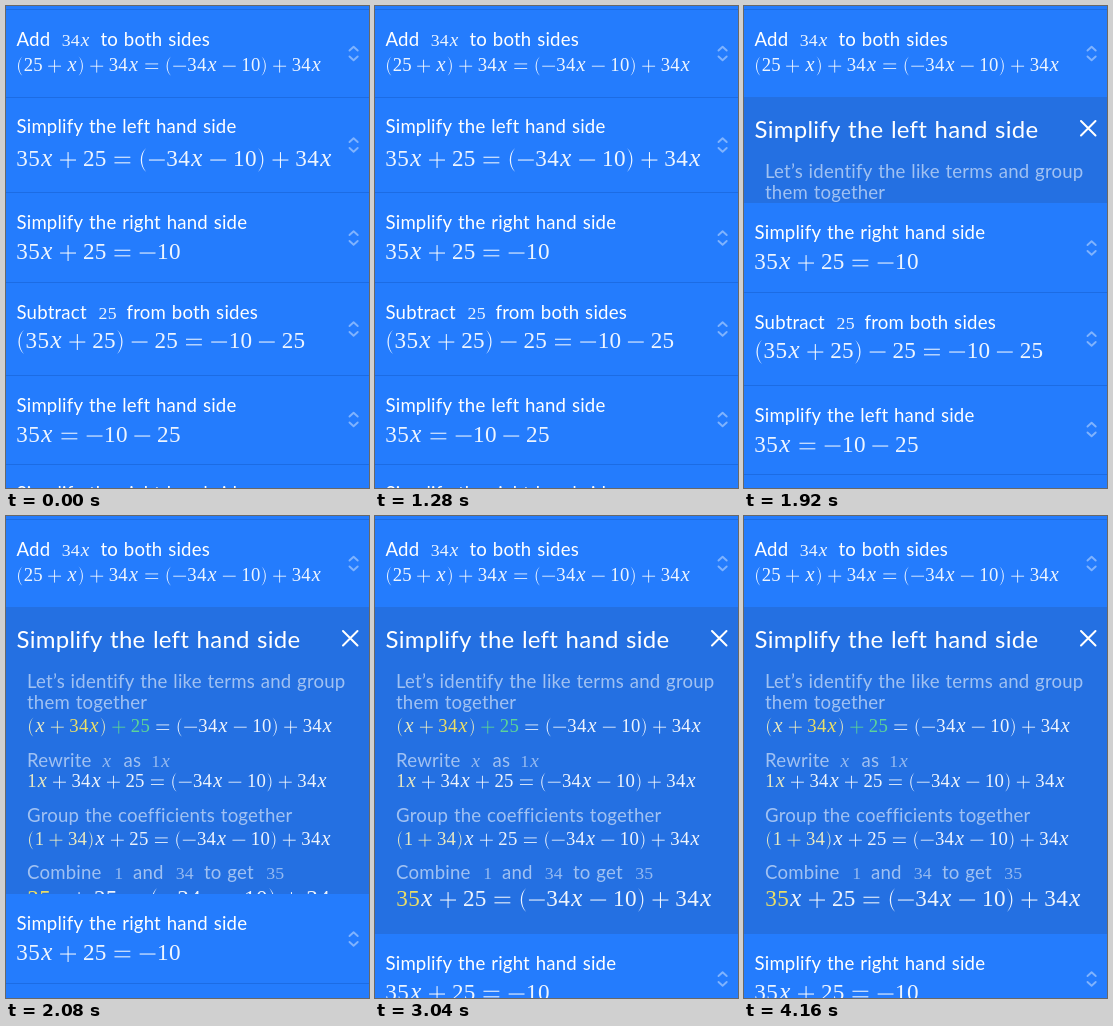
These frames come from a looping animation (363x482 px, 4.32 s). An HTML page with a canvas:

```html
<!DOCTYPE html>
<html lang="en">
<head>
<meta charset="utf-8">
<title>Equation steps</title>
<style>
  html, body { margin: 0; width: 100%; height: 100%; overflow: hidden; background: #247cfd; }
  canvas { display: block; width: 363px; height: 482px; }
</style>
</head>
<body>
<canvas id="stage"></canvas>
<script>
const W = 363, H = 482, LOOP = 4320, TICK = 160;
const BLUE = '#247cfd', PANEL = '#2470e2', RULE = '#1c6ce4';
const WHITE = '#fff', SOFT = 'rgba(255,255,255,.57)', ICON = 'rgba(255,255,255,.42)';
const CREAM = '#f8f3c0', YELLOW = '#fbe75c', GREEN = '#62dd91';
const TEXT = 18.6, SMALL = 19.3, LARGE = 23.85, INLINE = 18.3;

const PANEL_TOP = 91, PANEL_H = 96, GROWTH = 231;
const OPEN_AT = 1901.4, SPRING = 0.01775;
const RHS = '=(−34x−10)+34x';

const canvas = document.getElementById('stage');
const ctx = canvas.getContext('2d');
const dpr = window.devicePixelRatio || 1;
canvas.width = W * dpr;
canvas.height = H * dpr;

function say(text, x, y, color = WHITE, size = TEXT) {
  ctx.font = `${size}px Lato, sans-serif`;
  ctx.letterSpacing = size * 0.011 + 'px';
  ctx.wordSpacing = size * 0.04 + 'px';
  ctx.fillStyle = color;
  ctx.fillText(text, x, y);
}

function bar(x, y, w, h) {
  ctx.fillRect(x, y - h / 2, w, h);
}

function glyph(ch, x, y, size, style = '') {
  ctx.font = `${style} ${size}px "Liberation Serif", serif`;
  ctx.fillText(ch, x, y);
}

// A slender parenthesis: two arcs that meet at the tips.
function paren(ch, x, y, size) {
  const at = u => x + (ch === '(' ? u : 0.389 - u) * size;
  const top = y - 0.75 * size, mid = y - 0.25 * size, low = y + 0.25 * size;
  ctx.beginPath();
  ctx.moveTo(at(0.33), top);
  ctx.bezierCurveTo(at(0.03), mid - 0.27 * size, at(0.03), mid + 0.27 * size, at(0.33), low);
  ctx.bezierCurveTo(at(0.1), mid + 0.25 * size, at(0.1), mid - 0.25 * size, at(0.33), top);
  ctx.fill();
}

// Sets a formula from [string, colour] parts with TeX-like spacing.
function math(parts, x, y, size) {
  ctx.letterSpacing = ctx.wordSpacing = '0px';
  ctx.globalAlpha = 0.92;
  let prev = '(';
  for (const [text, color] of parts) {
    ctx.fillStyle = color;
    for (const ch of text) {
      if ('+−='.includes(ch)) {
        const unary = ch === '−' && '(='.includes(prev);
        const gap = unary ? 0 : ch === '=' ? 0.278 : 0.222;
        const left = x + (gap + 0.056) * size, w = 0.666 * size;
        const axis = y - 0.25 * size, line = 0.045 * size;
        if (ch === '=') {
          bar(left, axis - 0.117 * size, w, line);
          bar(left, axis + 0.117 * size, w, line);
        } else {
          bar(left, axis, w, line);
          if (ch === '+') bar(left + (w - line) / 2, axis, line, w);
        }
        x += (0.778 + 2 * gap) * size;
      } else if (ch === 'x') {
        glyph(ch, x + 0.055 * size, y, size * 1.05, 'italic');
        x += 0.572 * size;
      } else if ('()'.includes(ch)) {
        paren(ch, x, y, size);
        x += 0.389 * size;
      } else {
        glyph(ch, x + 0.01 * size, y, size * 0.97);
        x += 0.5 * size;
      }
      prev = ch;
    }
  }
  ctx.globalAlpha = 1;
}

const plain = (text, x, y, size, color = WHITE) => math([[text, color]], x, y, size);

function stroke(color, width, ...lines) {
  ctx.strokeStyle = color;
  ctx.lineWidth = width;
  ctx.lineCap = ctx.lineJoin = 'round';
  ctx.beginPath();
  for (const [start, ...rest] of lines) {
    ctx.moveTo(...start);
    for (const p of rest) ctx.lineTo(...p);
  }
  ctx.stroke();
}

function chevrons(y) {
  stroke(ICON, 1.9,
    [[343.5, y - 3], [347.6, y - 6.8], [351.7, y - 3]],
    [[343.5, y + 3], [347.6, y + 6.8], [351.7, y + 3]]);
}

function rule(y) {
  ctx.fillStyle = RULE;
  ctx.fillRect(0, y, W, 1);
}

function firstRow() {
  rule(3);
  say('Add', 10.5, 40);
  plain('34x', 55.5, 40, INLINE);
  say('to both sides', 94.5, 40);
  plain('(25+x)+34x=(−34x−10)+34x', 10, 65, SMALL);
  chevrons(47.5);
}

function closedRow() {
  rule(PANEL_TOP);
  say('Simplify the left hand side', 10.5, 127);
  plain('35x+25' + RHS, 10, 160, LARGE);
  chevrons(139);
  rule(186);
}

function laterRows() {
  say('Simplify the right hand side', 10.5, 223);
  plain('35x+25=−10', 10, 253, LARGE);
  chevrons(232);

  rule(276);
  say('Subtract', 10.5, 313);
  plain('25', 92.3, 313, INLINE);
  say('from both sides', 120.5, 313);
  plain('(35x+25)−25=−10−25', 10, 342, LARGE);
  chevrons(323);

  rule(369);
  say('Simplify the left hand side', 10.5, 406);
  plain('35x=−10−25', 10, 436, LARGE);
  chevrons(413.5);

  rule(458);
  say('Simplify the right hand side', 10.5, 494);
}

function openPanel(height) {
  ctx.save();
  ctx.beginPath();
  ctx.rect(0, PANEL_TOP, W, height);
  ctx.clip();
  ctx.fillStyle = PANEL;
  ctx.fillRect(0, PANEL_TOP, W, height);

  say('Simplify the left hand side', 10.5, 132, WHITE, 24);
  stroke(WHITE, 2, [[337, 115], [351.5, 129.5]], [[351.5, 115], [337, 129.5]]);

  say('Let’s identify the like terms and group', 21, 172, SOFT);
  say('them together', 21, 193, SOFT);
  math([['(x+', CREAM], ['34x', YELLOW], [')', CREAM], ['+25', GREEN], [RHS, WHITE]], 21, 216, SMALL);

  say('Rewrite', 21, 251, SOFT);
  plain('x', 95.5, 251, INLINE, SOFT);
  say('as', 117.5, 251, SOFT);
  plain('1x', 145, 251, INLINE, SOFT);
  math([['1x', CREAM], ['+34x+25' + RHS, WHITE]], 21, 271, SMALL);

  say('Group the coefficients together', 21, 306, SOFT);
  math([['(1+34)', CREAM], ['x+25' + RHS, WHITE]], 21, 329, SMALL);

  say('Combine', 21, 363, SOFT);
  plain('1', 108, 363, INLINE, SOFT);
  say('and', 127, 363, SOFT);
  plain('34', 169.5, 363, INLINE, SOFT);
  say('to get', 198, 363, SOFT);
  plain('35', 260, 363, INLINE, SOFT);
  math([['35', YELLOW], ['x+25' + RHS, WHITE]], 21, 390, LARGE);
  ctx.restore();
}

// Critically damped spring, 0 to 1.
function spring(ms) {
  const s = SPRING * Math.max(0, ms);
  return 1 - (1 + s) * Math.exp(-s);
}

function draw(now) {
  const t = Math.floor((now % LOOP) / TICK) * TICK;
  const shift = Math.round(GROWTH * spring(t - OPEN_AT));

  ctx.setTransform(dpr, 0, 0, dpr, 0, 0);
  ctx.fillStyle = BLUE;
  ctx.fillRect(0, 0, W, H);
  firstRow();
  if (shift > 0) openPanel(PANEL_H + shift);
  else closedRow();

  ctx.save();
  ctx.translate(0, shift);
  laterRows();
  ctx.restore();
}

const start = performance.now();
function frame() {
  draw(performance.now() - start);
  requestAnimationFrame(frame);
}
frame();
</script>
</body>
</html>
```
